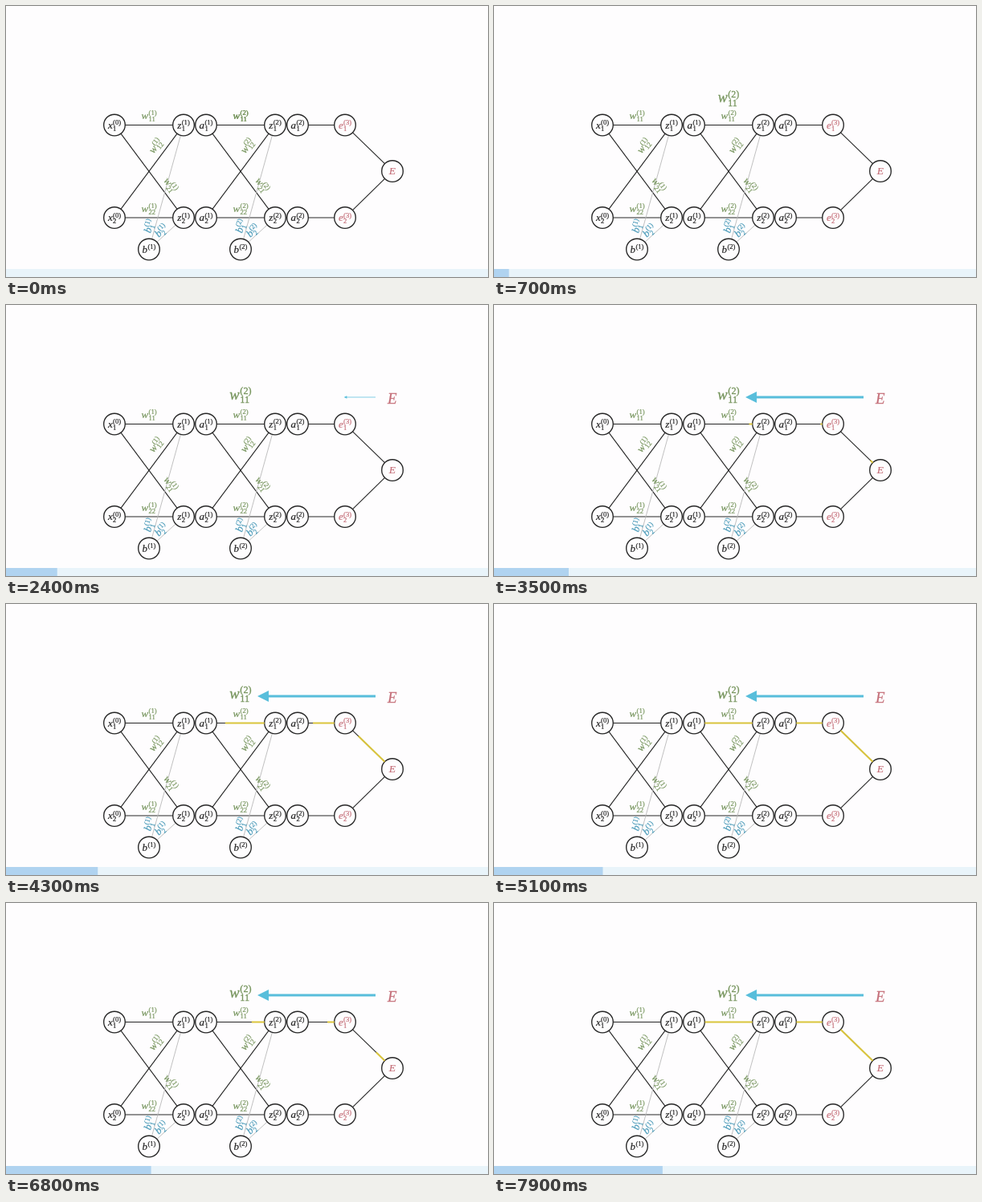
Recreate the animation shown at these times as an HTML page with a canvas. Size 600 by 338 pixels, loop 8 s.

```html
<!DOCTYPE html>
<html lang="en">
<head>
<meta charset="utf-8">
<title>Backpropagation</title>
<style>
html, body { margin: 0; width: 100%; height: 100%; overflow: hidden; background: #fefdfe; }
canvas { display: block; width: 600px; height: 338px; }
</style>
</head>
<body>
<canvas id="stage" width="600" height="338"></canvas>
<script>
const ctx = document.getElementById("stage").getContext("2d");
const LOOP = 8000;
const INK = "#262626", GREEN = "#78965f", BLUE = "#4b9bb9", RED = "#c5707a";
const GOLD = "#dac53c", SKY = "#58bedb";
const TOP = 148.5, LOW = 264, R = 13.3, STEP = 114;
const FACE = '"Liberation Serif", "Noto Serif", serif';

const sigmoid = x => 1 / (1 + Math.exp(-x));
const clamp = x => Math.min(1, Math.max(0, x));
const mix = (a, b, k) => a + (b - a) * k;

// Normalised logistic easing between two times in ms
function ease(t, from, to) {
  const x = clamp((t - from) / (to - from)), edge = sigmoid(-5);
  return clamp((sigmoid(10 * (x - 0.5)) - edge) / (1 - 2 * edge));
}

function line(x1, y1, x2, y2, color = INK, width = 1.1) {
  ctx.strokeStyle = color;
  ctx.lineWidth = width;
  ctx.beginPath();
  ctx.moveTo(x1, y1);
  ctx.lineTo(x2, y2);
  ctx.stroke();
}

// Straight link from the rim of one circle to the rim of another
function link(x1, y1, x2, y2, color, width) {
  const d = Math.hypot(x2 - x1, y2 - y1);
  const dx = (x2 - x1) / d * R, dy = (y2 - y1) / d * R;
  line(x1 + dx, y1 + dy, x2 - dx, y2 - dy, color, width);
}

function glyphs(text, x, y, font) {
  ctx.font = font;
  ctx.fillText(text, x, y);
  ctx.strokeText(text, x, y);
}

// Symbol with optional subscript and bracketed superscript, centred on x, y
function term(base, sub, sup, x, y, color, scale = 1, angle = 0) {
  const big = `italic ${base === "E" ? 13.5 : 13}px ${FACE}`, small = `8.6px ${FACE}`;
  const top = sup === "" ? "" : `(${sup})`;
  ctx.save();
  ctx.translate(x, y);
  ctx.rotate(angle * Math.PI / 180);
  ctx.scale(scale, scale);
  ctx.fillStyle = ctx.strokeStyle = color;
  ctx.lineWidth = 0.22;
  ctx.font = big;
  const w = ctx.measureText(base).width + 0.4;
  ctx.font = small;
  const s = Math.max(ctx.measureText(sub).width, ctx.measureText(top).width);
  const left = -(w + s) / 2;
  glyphs(base, left, 4.3, big);
  if (sub) glyphs(sub, left + w, 7.4, small);
  if (top) glyphs(top, left + w, -0.5, small);
  ctx.restore();
}

function node(x, y, base, sub, sup, color = INK) {
  ctx.strokeStyle = INK;
  ctx.lineWidth = 1.35;
  ctx.beginPath();
  ctx.arc(x, y, R, 0, Math.PI * 2);
  ctx.stroke();
  term(base, sub, sup, x, y, color);
}

function layer(n) {
  const o = (n - 1) * STEP, x = 135 + o, z = 221 + o, b = 178 + o;
  link(x, TOP, z, TOP);
  link(x, LOW, z, LOW);
  link(x, TOP, z, LOW);
  link(x, LOW, z, TOP);
  link(b, 303.5, z, TOP, "#b9b9b9", 0.9);
  link(b, 303.5, z, LOW, "#b9b9b9", 0.9);
  node(z, TOP, "z", "1", n);
  node(z, LOW, "z", "2", n);
  node(z + 28, TOP, "a", "1", n);
  node(z + 28, LOW, "a", "2", n);
  node(b, 303.5, "b", "", n);
  term("w", "11", n, b, 136.5, GREEN);
  term("w", "22", n, b, 252.5, GREEN);
  term("w", "12", n, b + 8, 174.5, GREEN, 1, -53);
  term("w", "21", n, b + 27, 223, GREEN, 1, 53);
  term("b", "1", n, b, 274.5, BLUE, 1, -73);
  term("b", "2", n, b + 15, 280, BLUE, 1, -46);
}

function network() {
  layer(1);
  layer(2);
  link(363, TOP, 422, TOP);
  link(363, LOW, 422, LOW);
  link(422, TOP, 481, 206);
  link(422, LOW, 481, 206);
  node(135, TOP, "x", "1", 0);
  node(135, LOW, "x", "2", 0);
  node(422, TOP, "e", "1", 3, RED);
  node(422, LOW, "e", "2", 3, RED);
  node(481, 206, "E", "", "", RED);
}

function trace(x1, y1, x2, y2, k) {
  const d = Math.hypot(x2 - x1, y2 - y1);
  const ux = (x2 - x1) / d, uy = (y2 - y1) / d, len = (d - 2 * R) * k;
  const sx = x1 + ux * R, sy = y1 + uy * R;
  line(sx, sy, sx + ux * len, sy + uy * len, GOLD, 2);
}

function highlight(t) {
  if (t <= 3000) return;
  const k = t < 6000 ? ease(t, 3000, 5000) : ease(t, 6000, 8000);
  if (k <= 0) return;
  ctx.globalAlpha = t < 6000 ? 1 - ease(t, 5000, 6000) : 1;
  trace(481, 206, 422, TOP, k);
  trace(422, TOP, 363, TOP, k);
  trace(335, TOP, 249, TOP, k);
  ctx.globalAlpha = 1;
}

function arrow(k) {
  if (k <= 0) return;
  ctx.save();
  ctx.translate(460, 115);
  ctx.scale(k, k);
  line(0, 0, -135, 0, SKY, 2.8);
  ctx.fillStyle = SKY;
  ctx.beginPath();
  ctx.moveTo(-147, 0);
  ctx.lineTo(-133, -7);
  ctx.lineTo(-133, 7);
  ctx.fill();
  ctx.restore();
}

function draw(t) {
  ctx.fillStyle = "#fefdfe";
  ctx.fillRect(0, 0, 600, 338);
  ctx.fillStyle = "#e9f4fa";
  ctx.fillRect(0, 328, 600, 10);
  ctx.fillStyle = "#b0d3f0";
  ctx.fillRect(0, 328, t * 0.02656, 10);

  network();
  highlight(t);
  const w = ease(t, 0, 1000), e = ease(t, 1000, 2000);
  term("w", "11", 2, 292, mix(136.5, 111.5, w), GREEN, mix(1, 1.43, w));
  if (e > 0) term("E", "", "", 481, mix(206, 116.5, e), RED, mix(1, 1.4, e));
  arrow(ease(t, 2000, 3000));
}

function tick(now) {
  draw(now % LOOP);
  requestAnimationFrame(tick);
}
draw(0);
requestAnimationFrame(tick);
</script>
</body>
</html>
```
